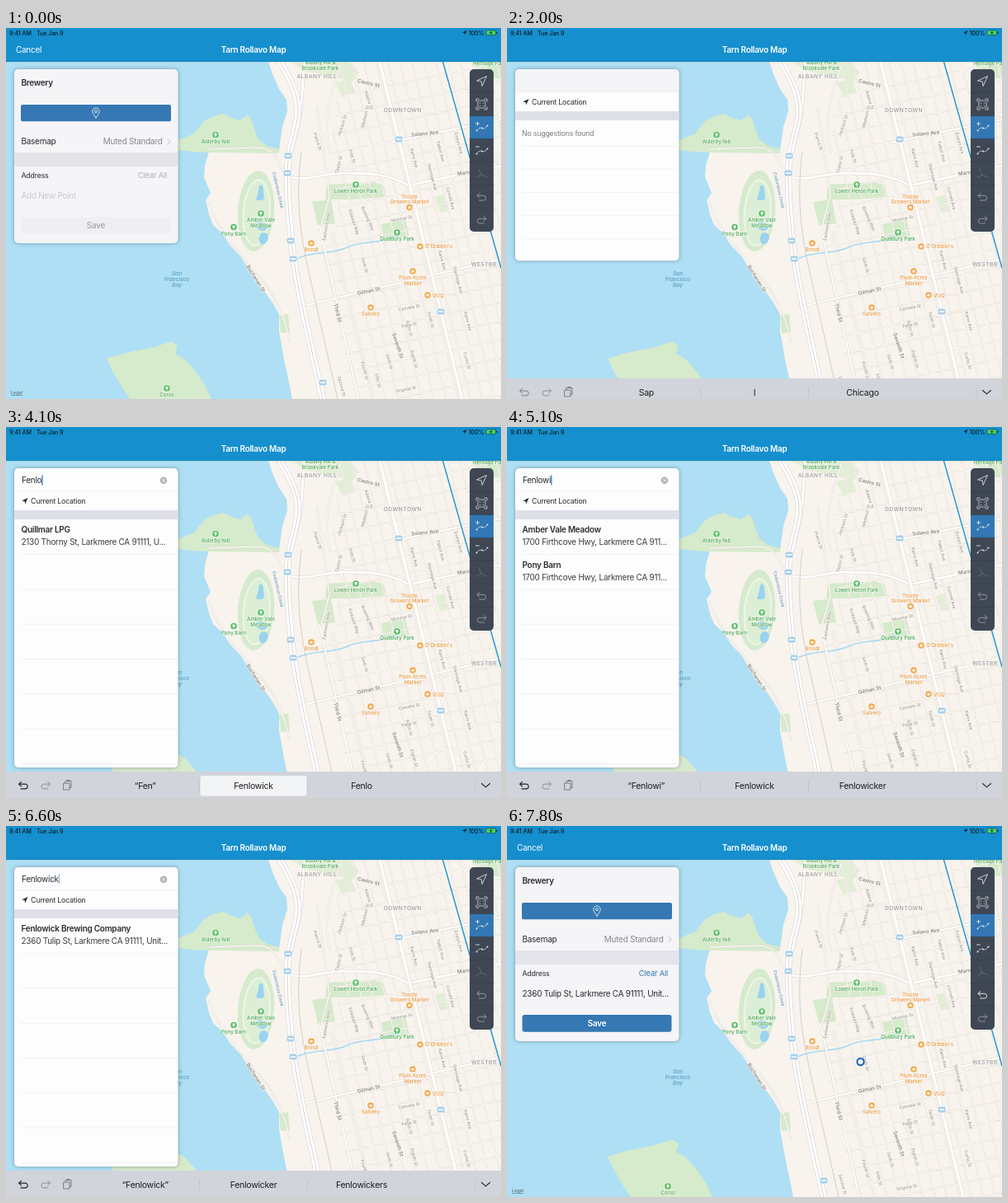
Animation, 600 px wide and 450 px high, one loop 8 s. Source, as an HTML page:

```html
<!DOCTYPE html>
<html lang="en">
<head>
<meta charset="utf-8">
<title>Map point search</title>
<style>
html, body { margin: 0; width: 100%; height: 100%; overflow: hidden; background: #aedff4; }
svg { display: block; width: 100vw; height: 100vh; }
text { font-family: Inter, Roboto, sans-serif; white-space: pre; }
.t17 { font-size: 9.96px; letter-spacing: -.25px; }
.t16 { font-size: 9.4px; letter-spacing: -.22px; }
.t15 { font-size: 8.8px; letter-spacing: -.2px; }
.t12 { font-size: 7.05px; letter-spacing: -.05px; font-weight: 500; }
.key { font-size: 10.5px; letter-spacing: -.25px; }
.b { font-weight: 600; }
.mid { text-anchor: middle; }
.end { text-anchor: end; }
.poi { font-size: 6.2px; font-weight: 500; letter-spacing: -.02px; paint-order: stroke; stroke: #fbf8f3; stroke-width: 1px; }
.street { font-size: 5.2px; fill: #8f8b86; text-anchor: middle; paint-order: stroke; stroke: #faf7f2; stroke-width: 1.2px; }
.main { font-size: 6.2px; font-weight: 500; fill: #7c7874; }
.area { font-size: 6.6px; letter-spacing: .55px; fill: #8d9298; text-anchor: middle; }
.water { font-size: 6.5px; font-weight: 500; font-style: italic; fill: #5b9cc4; text-anchor: middle; }
.line { fill: none; stroke-linecap: round; stroke-linejoin: round; }
.card { filter: drop-shadow(0 .5px 2.5px rgba(0, 0, 0, .32)); }
</style>
</head>
<body>
<svg id="stage" viewBox="0 0 600 450" preserveAspectRatio="none"></svg>
<script>
const LOOP = 8000, STEP = 100;
const stage = document.getElementById('stage');

const path = (d, stroke, width, extra = '') =>
  `<path class="line" d="${d}" stroke="${stroke}" stroke-width="${width}" ${extra}/>`;
const shape = (d, fill) => `<path d="${d}" fill="${fill}"/>`;
const rect = (x, y, w, h, fill, r = 0, extra = '') =>
  `<rect x="${x}" y="${y}" width="${w}" height="${h}" rx="${r}" fill="${fill}" ${extra}/>`;
const text = (x, y, str, cls, fill, extra = '') =>
  `<text x="${x}" y="${y}" class="${cls}" ${fill ? `fill="${fill}"` : ''} ${extra}>${str}</text>`;
const road = (d, width, casing = '#ddd6cd') =>
  path(d, casing, width + 1) + path(d, '#fff', width);

/* ---------- map ---------- */
const GREEN = '#d6eacc', PALE = '#e2eed6', LAND = '#f8f3ed', WATER = '#aedff4';

function ground() {
  const coast = 'M318 41 L323 56 331 74 340 87 341 101 335 120 332 141 331 149 L246 150 241 167 ' +
    '240 181 248 200 242 209 246 226 251 239 263 250 271 263 285 278 293 291 301 304 313 319 ' +
    '323 333 331 347 331 368 334 385 337 402 342 425 347 450 H600 V41Z';
  return rect(0, 41, 600, 409, WATER) + shape(coast, LAND) +
    shape('M190 138 L209 136 228 128 240 113 251 107 263 104 273 109 284 112 293 105 298 112 301 123 ' +
      '306 135 316 143 331 147 331 152 246 151 226 150 209 148 190 147Z', GREEN) +
    shape('M122 401 L145 394 180 387 200 380 208 385 205 395 217 402 231 418 241 433 249 450 H150 L140 435 129 416Z', GREEN) +
    shape('M345 41 H416 L428 54 419 66 396 58 366 53Z', PALE) +
    shape('M399 66 L417 62 424 78 408 84Z', PALE) +
    shape('M566 41 H600 V62 L574 58Z', GREEN) +
    shape('M389 190 L446 187 458 191 461 205 419 208 387 208Z', GREEN) +
    shape('M371 211 L394 208 399 237 378 239Z', GREEN) +
    shape('M455 238 L484 232 489 252 459 260Z', GREEN) +
    shape('M331 349 L342 347 344 369 333 370Z', GREEN) +
    shape('M520 205 L531 202 538 221 526 224Z', PALE);
}

function track() {
  return `<g transform="rotate(4 303 222)">
    <ellipse cx="303" cy="222" rx="22" ry="49" fill="#d6eace"/>
    <ellipse cx="304" cy="224" rx="16" ry="40" fill="#dcefd6" stroke="#eef6e6" stroke-width="2"/></g>` +
    shape('M307 191 Q312 189 312 197 L313 207 Q308 211 303 208 Q306 200 307 191Z', '#9ad3f0') +
    shape('M304 237 Q311 234 317 239 Q318 246 310 246 Q303 245 304 237Z', '#9ad3f0') +
    shape('M309 249 Q317 246 318 254 Q316 264 309 262 Q304 256 309 249Z', '#9ad3f0');
}

function streets() {
  let d = '';
  for (let x = 346; x < 606; x += 14.6) d += `M${x} 41 L${x + 100} 450`;
  for (let x = 256; x < 346; x += 14.6) d += `M${x + 45} 230 L${x + 100} 450`;
  for (let y = 92; y < 560; y += 22.4) d += `M360 ${y} L600 ${y - 50}`;
  const grid = `<clipPath id="town"><path d="M407 41 H600 V450 H421 L382 268 400 240 402 208 395 130Z"/></clipPath>
    <g clip-path="url(#town)">${path(d, '#e1dad2', 1.7)}${path(d, '#fdfbf8', .9)}</g>`;
  const freeway = 'M332 41 C350 70 358 92 352 116 C345 146 341 156 341 178 C341 212 344 240 347 268 C352 310 368 380 384 450';
  const ramp = 'M362 41 C358 74 360 98 353 122 C347 145 342 160 342 182';
  return grid +
    path('M352 280 C372 270 396 275 414 266 S446 264 476 251', '#a8dcf2', 1.6) +
    road('M246 147 L304 145 Q322 145 329 160 L337 175', 1.2) +
    road('M246 212 C258 250 288 278 309 304 S338 352 344 380', 1.1) +
    road('M380 240 L427 450', 2) +
    road('M377 98 L392 204 382 240', 1.2) +
    road('M407 41 C392 82 383 118 393 151', 1.2) +
    road('M356 338 L600 280', 2.2) +
    road('M465 139 L600 111', 2.2) +
    road('M341 180 C366 187 382 176 410 176 S462 176 488 191 L600 167', 2.8) +
    road('M453 41 L553 450', 3.4) +
    path('M358 150 C352 196 354 238 366 292 L402 450', '#cbc5be', .8) +
    road(ramp, 3, '#d3d1ce') + road(freeway, 7, '#d3d1ce') + path(freeway, '#d3d1ce', .9) +
    path('M529.5 41 L600 291', '#1b96d1', 1.4);
}

function shield(x, y) {
  return rect(x - 5, y - 4, 10, 8, '#a9d0e9', 2.5, 'stroke="#fff" stroke-width=".8"') +
    path(`M${x - 2.5} ${y} h5`, '#fff', 1.6);
}

const along = (list, rot, cls = 'street') => list.map(([str, x, y, r = rot]) =>
  text(x, y, str, cls, '', `transform="rotate(${r} ${x} ${y})"`)).join('');

function labels() {
  return along([
    ['Adams St', 438, 88, 72], ['Madison St', 437, 108, -76], ['Jackson St', 409, 119, -72],
    ['Polk St', 418, 156, 72], ['Taylor St', 405, 166, -76], ['Pierce St', 376, 138, 72],
    ['Kains Ave', 493, 158], ['Stannage Ave', 515, 181], ['Cornell Ave', 537, 207], ['Talbot Ave', 525, 150],
    ['Evelyn Ave', 547, 140], ['Kains Ave', 527, 282], ['Stannage Ave', 546, 306]
  ], 75) + along([
    ['Fourth St', 433, 416], ['Fifth St', 449, 428], ['Sixth St', 463, 405], ['Eighth St', 493, 402],
    ['Ninth St', 487, 365], ['Tenth St', 513, 354], ['Curtis St', 557, 404], ['Kains Ave', 558, 356],
    ['Second St', 405, 435], ['Sixth St', 433, 288], ['Bowling Way', 437, 232, 66], ['Kinkead Way', 420, 236, 72],
    ['Eastwind Way', 390, 241, -80]
  ], 75) + along([
    ['Monroe St', 480, 233], ['Camelia St', 489, 341], ['Page St', 489, 362], ['Virginia St', 485, 440]
  ], -11) + along([
    ['Castro St', 439, 69, 14], ['Solano Ave', 508, 130, -6], ['Marin Ave', 562, 177, -8],
    ['Gilman St', 440, 321, -12], ['Buchanan St', 301, 305, 58], ['Third St', 400, 346, 76], ['Seventh St', 473, 386, 72]
  ], 0, 'street main') +
    text(328, 197, 'Codornices Creek', 'water', '', 'transform="rotate(77 328 197)" style="font-size:5.2px"') +
    text(377, 61, 'ALBANY HILL', 'area') + text(481, 101.5, 'DOWNTOWN', 'area') +
    text(564, 289, 'WESTBR', 'area', '', 'style="text-anchor:start"') +
    ['San', 'Francisco', 'Bay'].map((s, i) => text(207, 300 + 7 * i, s, 'water')).join('');
}

const PARK = '#45a856', SHOP = '#eb9c48';
function poi(color, ink, x, y, lines, dx = 0, dy = 10.2) {
  const dot = `<circle cx="${x}" cy="${y}" r="4.1" fill="${color}" stroke="#fff" stroke-width=".6"/>`;
  const glyph = ink === PARK
    ? `<circle cx="${x}" cy="${y - .6}" r="1.7" fill="#fff"/>` + path(`M${x} ${y} v2.4`, '#fff', .9)
    : rect(x - 1.6, y - 1.3, 3.2, 2.9, '#fff', .7);
  return dot + glyph + lines.split('/').map((s, i) =>
    text(x + dx, y + dy + 6.6 * i, s, dx ? 'poi' : 'poi mid', ink)).join('');
}

function places() {
  const park = (...a) => poi('#57bd63', PARK, ...a), shop = (...a) => poi('#f1a94f', SHOP, ...a);
  return park(254, 129.6, 'Alderby Nib') + park(309, 225, 'Amber Vale/Meadow') + park(276, 241.5, 'Pony Barn') +
    park(424, 190, 'Lower Heron Park') + park(474, 248, 'Quillbury Park') + park(195, 437, 'Corso') +
    shop(370, 261, 'Brindl') + shop(502, 265, "O'Dribbin's", 6, 2.3) + shop(493, 295, 'Plum Acres/Market') +
    shop(511, 324, 'VUQ', 6, 2.6) + shop(442, 339, 'Salvero') + shop(489, 217.5, 'Thistle/Growers Market', 0, -11) +
    text(381, 44, 'Albany Hill &amp;', 'poi mid', PARK) + text(381, 50.5, 'Brookvale Park', 'poi mid', PARK) +
    text(566, 45, 'Heritage Pa', 'poi', PARK);
}

const map = ground() + track() + streets() + labels() + places() +
  [[342, 155], [341, 176], [345, 258], [348, 280], [384, 430], [476, 135], [527, 344]].map(p => shield(...p)).join('') +
  text(6, 444, 'Legal', '', '#4b5a63', 'font-size="5.4" text-decoration="underline"');

/* ---------- chrome ---------- */
const arrow = (x, y, s, fill, stroke = 'none') =>
  `<path d="M${x + s} ${y} L${x + s * .55} ${y + s} ${x + s * .47} ${y + s * .53} ${x} ${y + s * .45}Z" fill="${fill}" stroke="${stroke}" stroke-width=".85" stroke-linejoin="round"/>`;
const undoArc = (x, y) => `M${x - 2.5} ${y - 4.5} L${x - 5.5} ${y - 1.7} ${x - 2.5} ${y + 1.1} ` +
  `M${x - 5.5} ${y - 1.7} H${x + 2.2} A2.9 2.9 0 0 1 ${x + 2.2} ${y + 4.1} H${x - 3}`;
const mirror = x => `transform="translate(${2 * x} 0) scale(-1 1)"`;

const header = rect(0, 0, 600, 41, '#158fcd') + rect(0, 40.8, 600, .4, '#000', 0, 'opacity=".3"') +
  text(4, 8.6, '9:41 AM', 't12', '#0b1c26') + text(37, 8.6, 'Tue Jan 9', 't12', '#0b1c26') +
  arrow(553, 3, 5.5, '#0b1c26') + text(579.5, 8.6, '100%', 't12 end', '#0b1c26') +
  rect(582, 3, 11.5, 5.6, '#4cd964', 1.5, 'stroke="#0b1c26" stroke-width=".5"') +
  path('M587.8 4 v3.6 M586 5.8 h3.6', '#0b1c26', .7) + rect(594.3, 4.8, 1, 2, '#0b1c26', .4) +
  text(300, 30, 'Tarn Rollavo Map', 't17 b mid', '#fff') +
  text(12, 30, 'Cancel', 't17', '#fff', 'id="cancel"');

const ICON = '#e4e7ea';
function pathTool(y, sign) {
  return path(`M570.5 ${y + 4} Q574 ${y - 1} 577 ${y + 1} T583.5 ${y - 2}`, ICON, .7) +
    [[570.5, 4], [577, 1], [583.5, -2]].map(([x, d]) => `<circle cx="${x}" cy="${y + d}" r="1" fill="${ICON}"/>`).join('') +
    path(`M569.5 ${y - 4.5} h4 ${sign === '+' ? `M571.5 ${y - 6.5} v4` : ''}`, ICON, .9);
}
const tools = rect(562, 50, 29, 197, '#3e4753', 5) + rect(562, 106.5, 29, 28, '#3277b4') +
  path([78, 106, 134, 162, 190, 218].map(y => `M562 ${y + .4} h29`).join(''), '#353d48', .6) +
  arrow(570.5, 58.5, 12, 'none', ICON) +
  path('M570 89 v-3 h3 M580 86 h3 v3 M583 96 v3 h-3 M573 99 h-3 v-3', ICON, .75) +
  rect(572, 88, 9, 9, 'none', 1, `stroke="${ICON}" stroke-width=".7"`) +
  path('M574.5 91 h.1 M578.5 91 h.1 M574.5 94.5 h.1 M578.5 94.5 h.1', ICON, 1.1) +
  pathTool(120.5, '+') + pathTool(148.5, '-') +
  path('M570.5 181 L576 178 583 181 M576 178 L573 171', '#68717c', .8) +
  path(undoArc(576.5, 205), '#fff', .85, 'id="undo"') +
  path(undoArc(576.5, 233), '#a1a6ad', .8, mirror(576.5));

/* ---------- panel ---------- */
const DARK = '#2b2b2f', BLUE = '#3578b3';
const form = text(18.5, 69.6, 'Brewery', 't17 b', DARK) +
  path('M10 84.3 h198', '#efeff2', .6) +
  rect(18, 93, 182, 20.3, BLUE, 2) +
  path('M109 109 C106.6 105.4 104.8 103.4 104.8 101.2 a4.2 4.2 0 0 1 8.4 0 C113.2 103.4 111.4 105.4 109 109Z', '#fff', .8) +
  `<circle cx="109" cy="101.2" r="1.5" fill="none" stroke="#fff" stroke-width=".8"/>` +
  text(18.5, 141, 'Basemap', 't17', DARK) + text(189.6, 141, 'Muted Standard', 't17 end', '#87878c') +
  path('M196 134.5 l3 3.2 -3 3.2', '#bcbcc2', .9) +
  rect(10, 151, 198.5, 17, '#e4e4ea') +
  text(18.5, 182.1, 'Address', 't15', DARK) +
  text(195, 182.2, 'Clear All', 't16 end', '', 'id="clear"') +
  text(18.5, 207, '', 't17', '', 'id="point"') +
  rect(18.5, 229, 181, 20.8, BLUE, 3, 'id="saveBox"') + text(109, 243, 'Save', 't17 mid', '', 'id="save"');

const search = rect(10, 50, 198.5, 28, '#f4f4f6', 4, 'id="field"') +
  text(19, 68, '', 't17', DARK, 'id="typed"') + rect(0, 58.5, 1.3, 12, '#3579c4', 0, 'id="caret"') +
  `<g id="wipe"><circle cx="191" cy="64.7" r="4.3" fill="#b3b3b8"/>${path('M189.4 63.1 l3.2 3.2 m0 -3.2 l-3.2 3.2', '#fff', .9)}</g>` +
  path('M10 78 h198.5', '#efeff2', .7) +
  arrow(19, 86, 7.5, DARK) + text(30, 93, 'Current Location', 't15', DARK) +
  rect(10, 101, 198.5, 11, '#dfe0e7') +
  path('', '#efeff3', .8, 'id="rules"') + '<g id="hits"></g>';

const panel = `<clipPath id="cut"><rect id="cutBox" x="10" y="50" width="198.5" height="211" rx="5"/></clipPath>
  <rect id="card" class="card" x="10" y="50" width="198.5" height="211" rx="5"/>
  <g clip-path="url(#cut)"><g id="form">${form}</g><g id="search">${search}</g></g>`;

/* ---------- keyboard bar ---------- */
const SLOTS = [168.8, 300, 431];
const bar = `<g id="bar">${rect(0, 418, 600, 33, '#d1d4da')}
  ${rect(235.5, 423, 129, 24.5, '#f3f4f6', 3, 'id="lit"')}
  ${path('M234.5 429 v13 M365.5 429 v13 M569 429 v13', '#bdc1c8', .7)}
  ${path(undoArc(21, 434.8), '#222', 1.1, 'id="keyUndo"')}
  ${path(undoArc(48, 434.8), '#8b9097', 1, mirror(48))}
  ${path('M70 432 h7 v8 h-7Z M72 432 v-2.5 h7 v8 h-2 M74 429.5 v-1 h3 v1', '#70757c', .9)}
  ${path('M576.5 432.5 l5 4.4 5 -4.4', '#2a2c30', 1.2)}
  ${SLOTS.map((x, i) => text(x, 439, '', 'key mid', '#1d1e20', `id="slot${i}"`)).join('')}</g>`;

stage.innerHTML = map +
  `<circle id="pin" cx="428.5" cy="286" r="4.1" fill="#fff" stroke="#1c6bb4" stroke-width="2.1"/>` +
  header + tools + panel + bar;

/* ---------- timeline ---------- */
const OPEN = 1900, CLOSE = 7000, PLACED = 7300;
const WORD = 'Fenlowick';
const KEYS = [2900, 3300, 3600, 3850, 4050, 4600, 4900, 5400, 5850];
const PLACE = '2360 Tulip St, Larkmere CA 91111, Unit...';
const HWY = '1700 Firthcove Hwy, Larkmere CA 911...';
const HITS = [
  [0, []],
  [3900, [['Quillmar LPG', '2130 Thorny St, Larkmere CA 91111, U...']]],
  [4800, [['Amber Vale Meadow', HWY], ['Pony Barn', HWY]]],
  [6000, [[WORD + ' Brewing Company', PLACE]]]
];
// Parts between tildes are drawn faint while the words morph.
const WORDS = [
  [0, 'Sap', 'I', 'Chicago'],
  [3000, 'S~r~”', 'Fenl~w~', 'orida'],
  [3100, '“F”', WORD, 'Florida'],
  [3500, '“Fe”', WORD, 'Fen'],
  [3800, '“Fen”', WORD, 'Fenlo', true],
  [4200, '“Fenlo”', WORD, 'Fenlow', true],
  [4700, '“Fenlow”', WORD, 'Fenlowicker'],
  [5000, '“Fenlowi”', WORD, WORD + 'er'],
  [5900, '“Fenlowick”', WORD + 'er', WORD + 'ers']
];

const $ = id => document.getElementById(id);
const set = (id, attrs) => { for (const k in attrs) $(id).setAttribute(k, attrs[k]); };
const show = (id, on) => set(id, { visibility: on ? 'visible' : 'hidden' });
const clamp = v => Math.min(1, Math.max(0, v));
const ramp = (t, from, ms) => clamp((t - from) / ms);
const easeOut = p => 1 - (1 - p) ** 3;
const easeInOut = p => p < .5 ? 4 * p ** 3 : 1 - 4 * (1 - p) ** 3;
const at = (list, t) => list.filter(row => row[0] <= t).pop();

function drawForm(placed) {
  set('clear', { fill: placed ? BLUE : '#b0b0b5' });
  set('point', { fill: placed ? DARK : '#c9c9ce' });
  $('point').textContent = placed ? PLACE : 'Add New Point';
  set('saveBox', { fill: placed ? BLUE : '#efeef1' });
  set('save', { fill: placed ? '#fff' : '#a6a6ab', 'font-weight': placed ? 600 : 500 });
  set('undo', { stroke: placed ? '#fff' : '#a1a6ad' });
  show('pin', placed);
}

function drawSearch(t) {
  const count = KEYS.filter(k => k <= t).length;
  const last = count ? KEYS[count - 1] : OPEN + 200;
  $('typed').textContent = WORD.slice(0, count);
  const blink = clamp(.5 + 1.5 * Math.cos((t - last) / 1000 * 2 * Math.PI));
  set('caret', { x: 19 + $('typed').getComputedTextLength(), opacity: t < OPEN + 200 ? 0 : blink });
  set('wipe', { opacity: count ? 1 : 0 });
  set('field', { opacity: 1 - ramp(t, OPEN + 100, 200) });

  const hits = at(HITS, t)[1], gap = hits.length ? 42.3 : 28.2;
  let d = '';
  for (let y = hits.length ? 154.6 : 143; y < 413; y += gap) d += `M18 ${y} H208.5`;
  set('rules', { d });
  $('hits').innerHTML = hits.length
    ? hits.map(([name, addr], i) => text(18.5, 128.3 + gap * i, name, 't17 b', DARK) +
        text(18.5, 143.3 + gap * i, addr, 't17', '#3c3c40')).join('')
    : text(18, 130.6, 'No suggestions found', 't15', '#7d7d82');

  const [, a, b, c, lit] = at(WORDS, t);
  [a, b, c].forEach((s, i) => {
    $('slot' + i).innerHTML = s.split('~').map((part, j) =>
      j % 2 ? `<tspan fill-opacity=".3" font-size="8.5">${part}</tspan>` : part).join('');
  });
  show('lit', lit);
  set('keyUndo', { stroke: count ? '#222' : '#8b9097' });
}

function render(t) {
  const searching = t >= OPEN && t < CLOSE;
  const grow = easeInOut(ramp(t, OPEN, 306)) - easeInOut(ramp(t, CLOSE, 306));
  const lift = easeOut(ramp(t, OPEN, 252)) - easeOut(ramp(t, CLOSE, 252));
  const height = 211 + 152 * grow;
  set('card', { height, fill: searching ? '#fdfdfe' : '#f5f4f7' });
  set('cutBox', { height });
  set('bar', { transform: `translate(0 ${32 * (1 - lift)})`, opacity: lift > 0 ? 1 : 0 });
  set('form', { display: searching ? 'none' : 'inline' });
  set('search', { display: searching ? 'inline' : 'none' });
  show('cancel', !searching);
  drawForm(t >= PLACED);
  drawSearch(t);
}

let tick = -1;
const start = performance.now();
function frame() {
  const t = Math.floor((performance.now() - start) % LOOP / STEP) * STEP;
  if (t !== tick) render(tick = t);
  requestAnimationFrame(frame);
}
frame();
</script>
</body>
</html>
```
